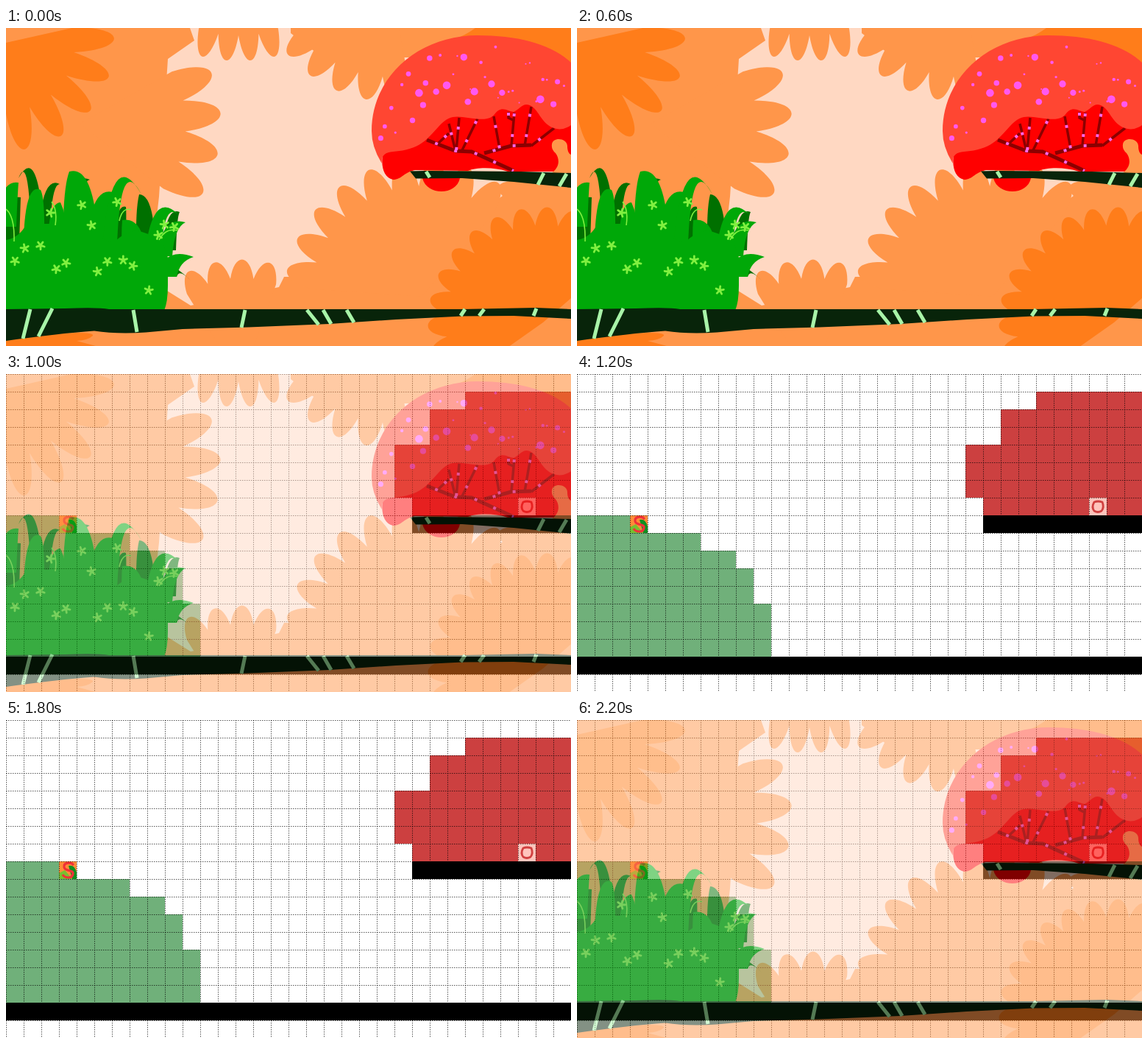
Animation, 768 px wide and 432 px high, one loop 2.3 s. Source, as an HTML page:

```html
<!DOCTYPE html>
<html lang="en">
<head>
<meta charset="utf-8">
<title>Level layout</title>
<style>
  html, body { margin: 0; width: 100%; height: 100%; overflow: hidden; background: #ff964a; }
  svg { display: block; width: 100vw; height: 100vh; }
</style>
</head>
<body>
<svg viewBox="0 0 768 432" preserveAspectRatio="none">
  <g id="scene"></g>
  <g id="tiles" opacity="0"></g>
</svg>
<script>
const scene = document.getElementById('scene');
const tiles = document.getElementById('tiles');

function add(parent, tag, attrs) {
  const node = document.createElementNS('http://www.w3.org/2000/svg', tag);
  for (const key in attrs) node.setAttribute(key, attrs[key]);
  parent.append(node);
  return node;
}
const fill = (color, d, parent = scene) => add(parent, 'path', { d, fill: color });
const line = (color, width, d, more = {}, parent = scene) =>
  add(parent, 'path', { d, fill: 'none', stroke: color, 'stroke-width': width, ...more });

function seeded(seed) {
  return () => (seed = (seed * 16807) % 2147483647) / 2147483647;
}
const golden = i => (i * 0.618034) % 1;

// A fan of evenly turned petals; angles in degrees, start is the first tip.
function flower(color, cx, cy, tipRadius, notchRadius, start, step, count) {
  const at = (radius, degrees) => {
    const a = degrees * Math.PI / 180;
    return [cx + radius * Math.cos(a), cy + radius * Math.sin(a)];
  };
  let d = `M${cx} ${cy}L${at(notchRadius, start - step / 2)}`;
  for (let i = 0; i < count; i++) {
    const tip = start + i * step;
    const reach = notchRadius + (tipRadius - notchRadius) * 4 / 3;
    d += `C${at(reach, tip - step * 0.27)} ${at(reach, tip + step * 0.27)} ${at(notchRadius, tip + step / 2)}`;
  }
  fill(color, d + 'Z');
}

function drawBackdrop() {
  const orange = '#ff964a', deep = '#ff7d1a';
  fill('#ffd8c2', 'M0 0H768V432H0Z');
  fill(orange, `M0 0H250L256 17L220 42L208 229L200 300L219 357L251 377L371 352L378 338H565
    L656 247Q664 235 675 228C660 215 672 207 700 207H768V432H0Z`);
  fill(orange, 'M387 0V7L430 40H768V0Z');
  flower(orange, 100, 130, 193, 144, -21, 16.8, 4);
  flower(orange, 316, -165, 210, 175, 76.5, 9, 4);
  flower(orange, 520, -80, 180, 146, 86.5, 13.3, 5);
  flower(orange, 565, 365, 187, 150, 191, 14.1, 9);
  flower(orange, 320, 480, 166, 140, 244.5, 12.9, 4);
  flower(deep, 0, 20, 148, 93, -2.3, 20.6, 6);
  flower(deep, 730, 400, 157, 132, 151.5, 13.4, 13);
  fill(deep, 'M612 14Q624 10 638 0H768V60H690Z');
  fill(deep, 'M0 420L95 414Q120 414 118 418Q112 424 96 425L122 432H0Z');
}

function drawTree() {
  fill('#ff0000', `M514 165C508 183 512 203 526 206C538 206 542 195 556 193L628 194
    C640 189 664 189 682 195H768V90H580ZM566 204C572 228 612 228 617 204Z`);
  fill('#ff964a', `M742 158C743 148 762 149 763 160C763 167 765 171 768 172V198H740
    C753 190 753 178 747 170Q741 165 742 158Z`);

  const twigs = `M602 130L611 167M616 122L612 167M620 166L641 123M587 157L602 143
    M687 160L691 115M705 160L714 107M714 160L745 136M663 120L671 164M691 126L683 122V114`;
  const boughs = 'M572 152L611 167L633 168L690 194M650 170L687 160L714 159';
  line('#8c0000', 3.5, twigs);
  line('#8c0000', 5, boughs);
  for (const d of [twigs, boughs])
    line('#ff64e8', 4, d, { 'stroke-dasharray': '4 24', 'stroke-dashoffset': -12 });

  fill('#ff4632', `M768 47C742 22 696 10 641 10C562 10 497 65 497 140Q497 162 511 184Q509 169 526 168
    C564 165 572 151 588 134C604 116 615 121 628 122C653 126 660 123 665 116
    C674 105 682 113 690 114C698 111 702 101 712 105C723 109 727 128 742 135Q755 141 768 132Z`);
  const random = seeded(41);
  for (let i = 1; i <= 38; i++) {
    const cx = 506 + 258 * golden(i);
    const top = 148 - 124 * Math.sqrt(1 - ((cx - 641) / 146) ** 2);
    const bottom = cx < 560 ? 155 : 106;
    const cy = top + (bottom - top) * random();
    add(scene, 'circle', { cx, cy, r: 1 + 4.5 * random() ** 1.7, fill: '#ff58f0' });
  }
}

// A leaf that rises from its base, arches by lift and ends in a point.
function blade(color, x, y, halfWidth, tipX, tipY, lift) {
  const lean = tipX - x, side = Math.sign(lean) * halfWidth, crown = tipY - lift;
  fill(color, `M${x - side} ${y}Q${x - side + lean * 0.3} ${crown} ${tipX} ${tipY}
    Q${x + side + lean * 0.1} ${crown + halfWidth * 1.5} ${x + side} ${y}Z`);
}

function drawBush() {
  const dark = '#007000', green = '#00a808', lime = '#80f040';
  blade(dark, 5, 292, 13, 20, 230, 5);
  blade(dark, 43, 285, 9, 17, 204, 50);
  blade(dark, 52, 275, 8, 73, 212, 12);
  blade(dark, 88, 270, 10, 114, 206, 12);
  blade(dark, 155, 292, 8, 163, 243, 5);
  blade(dark, 190, 295, 13, 181, 226, 0);
  blade(dark, 222, 302, 9, 236, 250, 8);
  blade(dark, 219, 338, 13, 251, 343, 36);

  blade(green, 0, 270, 14, 17, 210, 5);
  blade(green, 38, 285, 14, 47, 220, 10);
  blade(green, 70, 290, 13, 74, 237, 0);
  blade(green, 102, 300, 24, 86, 195, 10);
  blade(green, 122, 300, 14, 145, 223, 8);
  blade(green, 141, 295, 10, 184, 226, 70);
  blade(green, 174, 305, 16, 158, 261, 5);
  blade(green, 200, 305, 11, 236, 255, 38);
  blade(green, 215, 310, 11, 244, 264, 10);
  blade(green, 218, 338, 14, 255, 311, 15);
  fill(green, `M0 384V288Q18 285 28 266H112Q130 290 147 291Q160 278 176 275
    Q215 282 220 312V350Q220 372 215 384Z`);
  line(lime, 1.6, 'M0 246Q12 256 11 290M62 236Q70 247 67 268M170 247Q158 243 154 262M208 288Q217 271 233 275');

  const random = seeded(7);
  for (let i = 1; i <= 17; i++) {
    const x = 4 + 238 * golden(i);
    const y = 203 + x * 0.22 + random() * (x > 205 ? 45 : 120);
    const turn = random() * 6;
    let d = '';
    for (let k = 0; k < 5; k++) {
      const angle = k * Math.PI * 0.4 + turn;
      d += `M${x} ${y}l${5.5 * Math.cos(angle)} ${5.5 * Math.sin(angle)}`;
    }
    line(lime, 2.8, d, { 'stroke-linecap': 'round' });
  }
}

function drawGround() {
  const soil = '#08240a', mint = '#a8f4a8';
  fill(soil, 'M549 194.5L570 194L700 195L768 197V217L690 209L620 204L557 204.5Z');
  line(mint, 5, 'M571 195L576 203M731 197L723 213M762 198L752 215');
  fill(soil, `M0 382L80 381Q125 379 140 382H620L720 380L768 382V395L690 391L620 391.5L530 396
    L440 402L330 406.5L240 409L190 413.5Q150 416 120 411.5Q70 415 0 425Z`);
  line(mint, 5, `M33 382L23 422M63 381L44 419M173 383L178 413M325 383L320 407
    M409 383L425 403M431 383L442 402M463 383L473 400M624 382L618 391M650 382L643 391M721 381L717 391`);
}

function drawTiles() {
  const paint = (color, d) => fill(color, d, tiles);
  paint('#fff', 'M0 0H768V432H0Z');
  paint('#cc4040', 'M624 24H768V192H552V168H528V96H576V48H624Z');
  paint('#70b07a', 'M0 192H96V216H168V240H216V264H240V312H264V384H0Z');
  paint('#000', 'M552 192H768V216H552ZM0 384H768V408H0Z');

  paint('#ff8c38', 'M72 192H96V216H72Z');
  paint('#78c030', 'M72 208L80 204L90 216H72Z');
  paint('#109020', 'M85 198Q93 196 96 207V216H90Z');
  line('#f03038', 3.2, 'M92 197C87 192 78 194 79 200C80 206 92 203 91 209C90 216 80 215 77 210', {}, tiles);
  paint('#ffc4bc', 'M696 168H720V192H696Z');
  line('#d04040', 2.8, 'M703 174Q708 172 714 174Q717 181 713 186Q708 189 703 186Q699 181 703 174Z', {}, tiles);

  let grid = '';
  for (let x = 0; x < 768; x += 24) grid += `M${x + 0.5} 0V432`;
  for (let y = 0; y < 432; y += 24) grid += `M0 ${y + 0.5}H768`;
  line('#000', 1, grid, { 'stroke-dasharray': '1.5 1.5', 'stroke-opacity': 0.65 }, tiles);
}

drawBackdrop();
drawTree();
drawBush();
drawGround();
drawTiles();

const LOOP = 2300;
const steps = [[0, 0], [1000, 0.5], [1200, 1], [2200, 0.5], [LOOP, 0.5]];
tiles.animate(
  steps.map(([time, opacity]) => ({ offset: time / LOOP, opacity, easing: 'steps(1, end)' })),
  { duration: LOOP, iterations: Infinity });
</script>
</body>
</html>
```
